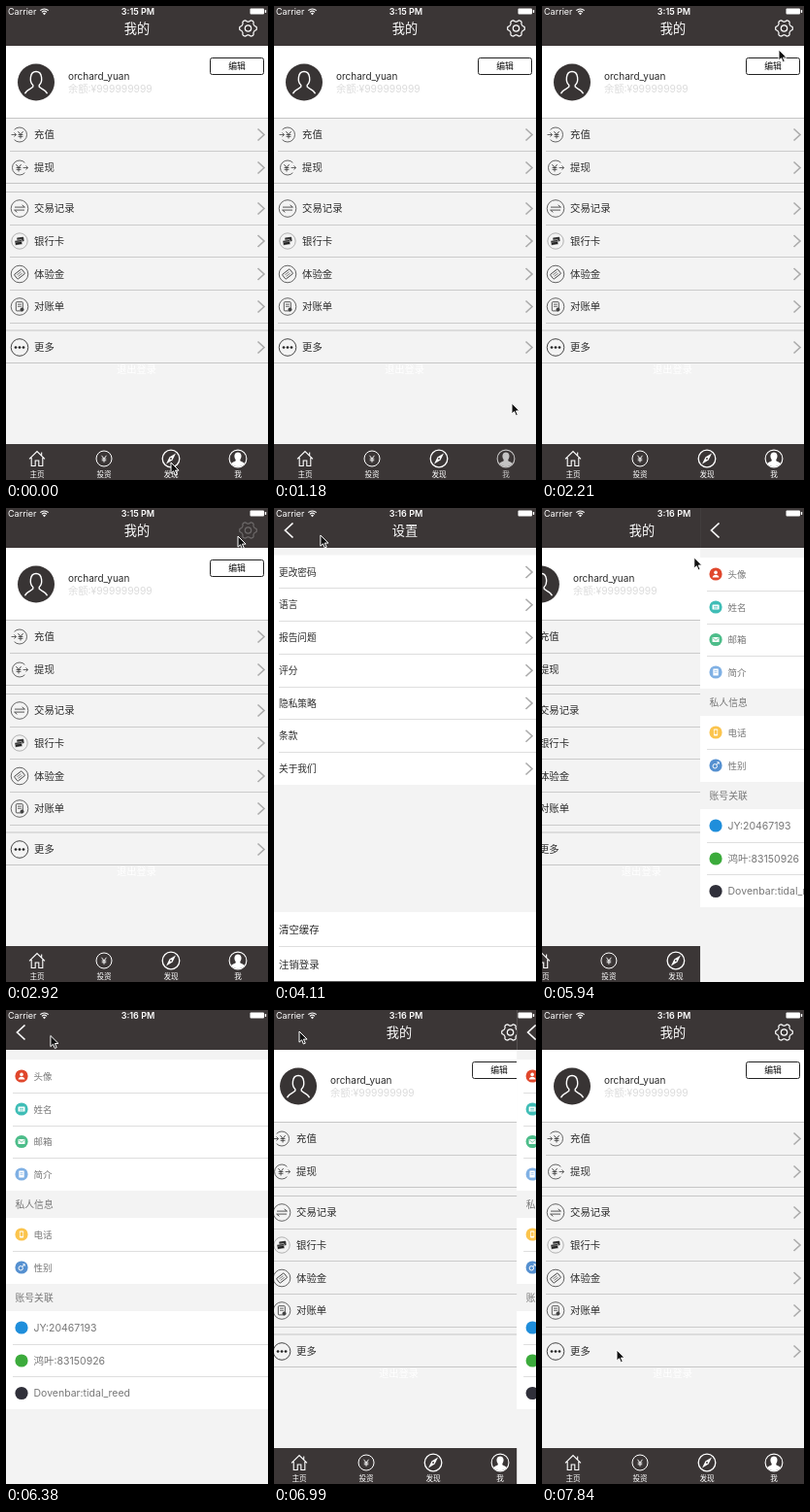
An HTML page that plays this animation: 270 px wide and 488 px high, repeating every 8000 ms.

```html
<!DOCTYPE html>
<html lang="zh-CN">
<head>
<meta charset="utf-8">
<title>我的</title>
<style>
  html, body { margin: 0; width: 100%; height: 100%; overflow: hidden; background: #f3f3f3; }
  svg { display: block; width: 100vw; height: 100vh; }
  text { font-family: Inter, "Noto Sans CJK SC", "Noto Sans CJK", sans-serif; white-space: pre; }
</style>
</head>
<body>
<svg id="stage" viewBox="0 0 270 488" preserveAspectRatio="none"></svg>
<script>
const LOOP = 8000;
const DARK = '#3b3636', GREY = '#f3f3f3', INK = '#2b2b2b';

// Markup helpers
const rect = (x, y, w, h, fill, more = '') =>
  `<rect x="${x}" y="${y}" width="${w}" height="${h}" fill="${fill}" ${more}/>`;
const disc = (x, y, r, fill, more = '') =>
  `<circle cx="${x}" cy="${y}" r="${r}" fill="${fill}" ${more}/>`;
const ring = (x, y, r, color, w = 1) => disc(x, y, r, 'none', `stroke="${color}" stroke-width="${w}"`);
const line = (d, color, w = 1, more = '') =>
  `<path d="${d}" fill="none" stroke="${color}" stroke-width="${w}" ${more}/>`;
const shape = (d, fill) => `<path d="${d}" fill="${fill}"/>`;
const group = (body, attrs = '') => `<g ${attrs}>${body}</g>`;
const at = (x, y, body) => group(body, `transform="translate(${x} ${y})"`);
// Text placed by its vertical middle
const text = (s, x, cy, size, fill, more = '') =>
  `<text x="${x}" y="${(cy + size * 0.37).toFixed(2)}" font-size="${size}" fill="${fill}" ${more}>${s}</text>`;
const MID = 'text-anchor="middle"';
const rule = (x, y, color) => rect(x, y, 270 - x, 1, color);
const chevron = cy => line(`M259.5 ${cy - 6}l6.5 6l-6.5 6`, '#ababab', 1.6);

const navBar = title => rect(0, 0, 270, 41, DARK) + (title ? text(title, 135, 23, 13.2, '#fff', MID) : '');
const backArrow = id => line('M19.5 15.5L11.5 23L19.5 30.5', '#fff', 1.7, `id="${id}"`);

function gear() {
  const pts = [];
  for (let i = 0; i < 72; i++) {
    const a = i * Math.PI / 36;
    const r = 7.9 + 0.95 * Math.tanh(2.2 * Math.cos(6 * a));
    pts.push(`${(r * Math.cos(a)).toFixed(2)} ${(r * Math.sin(a)).toFixed(2)}`);
  }
  return line(`M${pts.join('L')}Z`, '#fff', 1.2) + ring(0, 0, 3.2, '#fff', 1.2);
}

// Menu icons, drawn around 0,0
const yen = (c, k = 1) => line(`M${-2.6 * k} ${-3.4 * k}L0 0L${2.6 * k} ${-3.4 * k}M0 0V${4 * k}M${-2.4 * k} 0H${2.4 * k}M${-2.4 * k} ${1.9 * k}H${2.4 * k}`, c, 0.9);
const ringed = body => ring(0, 0, 8.8, '#555', 0.9) + body;
const icons = {
  topUp: line('M-5.4 -5.2A7.5 7.5 0 1 1 -5.4 5.2M-8.5 0H-3.6M-5.6 -2L-3.4 0L-5.6 2', '#555', 0.9) + at(1, 0, yen('#444')),
  payOut: line('M5.4 -5.2A7.5 7.5 0 1 0 5.4 5.2M3.6 0H8.5M6.5 -2L8.7 0L6.5 2', '#555', 0.9) + at(-1, 0, yen('#444')),
  trade: ringed(line('M-5 -1.4H5.4L2.6 -3.6M5 1.6H-5.4L-2.6 3.8', '#444', 0.9)),
  cards: ring(0, 0, 8.2, '#aaa', 0.9) +
    group(rect(-2.4, -3.8, 7, 4.6, '#333', 'rx=".7"') + rect(-5, -1.2, 7.4, 5, '#222', 'rx=".7" stroke="#f3f3f3" stroke-width=".6"') +
      rect(-5, 0.3, 7.4, 0.8, '#888'), 'transform="rotate(-8)"'),
  ticket: ringed(group(rect(-4.8, -3, 9.6, 6, 'none', 'rx=".8" stroke="#444" stroke-width=".9"') +
    line('M-2.6 -1H2.6M-2.6 1H2.6', '#555', 0.7), 'transform="rotate(-38)"')),
  bill: ringed(rect(-3.7, -4.8, 7, 9.2, 'none', 'rx=".8" stroke="#444" stroke-width=".9"') +
    line('M-2 -2.3H1.8M-2 -.2H1.8', '#444', 0.8) + disc(2.5, 3, 2, '#444')),
  more: ring(0, 0, 8.8, '#444', 1) + [-4, 0, 4].map(x => disc(x, 0, 1.35, '#222')).join('')
};

const menu = [
  ['充值', 132.5, 'topUp'], ['提现', 166.5, 'payOut'], ['交易记录', 208.5, 'trade'],
  ['银行卡', 242, 'cards'], ['体验金', 276, 'ticket'], ['对账单', 309.5, 'bill'], ['更多', 351.5, 'more']
];

const avatar = disc(0, 0, 19, '#383434') +
  line('M-11.5 11.8C-10 7.2 -4.8 7 -3.2 4.7V3C-7 -.4 -6.8 -11 0 -11C6.8 -11 7 -.4 3.2 3V4.7C4.8 7 10 7.2 11.5 11.8', '#fff', 1.4);

const tabs = [
  ['主页', 32, line('M-8 .3L0 -7.5L8 .3M-5.8 -1V7.5H-1.8V2H1.8V7.5H5.8V-1M4.7 -3.5V-6.5', '#fff', 1.1)],
  ['投资', 101, ring(0, 0, 8, '#fff', 1) + yen('#fff', 0.95)],
  ['发现', 170, ring(0, 0, 8.8, '#fff', 1.3) + shape('M5 -5.4L1.6 1.6L-5 5.4L-1.6 -1.6Z', '#fff') + disc(0, 0, 0.9, DARK)],
  ['我', 239, ring(0, 0, 8.9, '#fff', 1.1) +
    shape('M0 -6.6C4 -6.6 4.4 -1.6 2.3 1V2.2C4 3.2 6 3.4 6.9 5.2C3.4 9.2 -3.4 9.2 -6.9 5.2C-6 3.4 -4 3.2 -2.3 2.2V1C-4.4 -1.6 -4 -6.6 0 -6.6Z', '#fff')]
];

const homePage = rect(0, 0, 270, 488, GREY) + rect(0, 41, 270, 74, '#fff') + navBar('我的') +
  at(249.5, 23, group(gear(), 'id="gear"')) +
  at(31, 78.5, avatar) +
  text('orchard_yuan', 64, 72.5, 10, INK) +
  text('余额:¥999999999', 64, 85, 10.3, '#dcdcdc') +
  rect(210.5, 53.5, 55, 17, '#fff', 'rx="2" stroke="#222"') +
  text('编辑', 238, 62, 8.8, '#111', MID) +
  [115, 182, 191, 333.5, 367].map(y => rule(0, y, '#c6c6c6')).join('') +
  [149, 225, 258, 292, 326].map(y => rule(4, y, '#cbcbcb')).join('') +
  menu.map(([s, y, icon]) => at(14, y, icons[icon]) + text(s, 29, y, 10.4, INK) + chevron(y)).join('') +
  text('退出登录', 134.5, 374, 10.3, '#fff', MID + ' font-weight="500"') +
  rect(0, 451, 270, 37, DARK) +
  tabs.map(([s, x, icon], i) => group(at(x, 466, icon) + text(s, x, 482.3, 7.6, '#fff', MID), `id="tab${i}"`)).join('');

const settings = ['更改密码', '语言', '报告问题', '评分', '隐私策略', '条款', '关于我们'];
const settingsPage = rect(0, 0, 270, 488, GREY) + navBar('设置') + backArrow('backA') +
  rect(0, 48.5, 270, 236.5, '#fff') +
  settings.map((s, i) => {
    const y = 66 + i * 33.75;
    return text(s, 5, y, 9.7, INK) + chevron(y) + (i < 6 ? rule(5, Math.round(y + 16.4), '#dedede') : '');
  }).join('') +
  rect(0, 416, 270, 72, '#fff') + rule(5, 451, '#dedede') +
  text('清空缓存', 5, 434, 10.4, INK) + text('注销登录', 5, 470, 10.4, INK) +
  rect(0, 487, 270, 1, '#555');

// Small white marks inside the profile discs
const marks = {
  person: disc(0, -1.6, 1.8, '#fff') + shape('M-3.4 3.6C-3 -.2 3 -.2 3.4 3.6Z', '#fff'),
  card: rect(-3.5, -2.6, 7, 5.2, '#fff', 'rx=".6"') + line('M-2 -.6H2M-2 1H2', '#3fbdb6', 0.7),
  mail: rect(-3.5, -2.6, 7, 5.2, '#fff', 'rx=".6"') + line('M-3.2 -2L0 .8L3.2 -2', '#4dbd8a', 0.8),
  page: rect(-2.7, -3.5, 5.4, 7, '#fff', 'rx=".5"') + line('M-1.5 -1.4H1.5M-1.5 .3H1.5', '#7fb0e4', 0.7),
  phone: rect(-2.1, -3.6, 4.2, 7.2, '#fff', 'rx=".8"') + rect(-1.4, -2.4, 2.8, 4.2, '#fbc44d'),
  sex: ring(-0.8, 0.8, 2.2, '#fff', 1) + line('M.8 -.8L3.2 -3.2M1.2 -3.2H3.2V-1.2', '#fff', 0.9)
};
const fields = [
  ['头像', 68, '#e0472c', 'person'], ['姓名', 102, '#3fbdb6', 'card'], ['邮箱', 135.5, '#4dbd8a', 'mail'],
  ['简介', 169, '#7fb0e4', 'page'], ['电话', 231, '#fbc44d', 'phone'], ['性别', 265, '#5590d0', 'sex'],
  ['JY:20467193', 327, '#1f8edb'], ['鸿叶:83150926', 361, '#3cab3c'], ['Dovenbar:tidal_reed', 394.5, '#30303a']
];
const profilePage = rect(0, 0, 270, 488, GREY) + navBar('') + backArrow('backB') +
  rect(0, 51, 270, 135, '#fff') + rect(0, 214, 270, 68, '#fff') + rect(0, 310, 270, 101, '#fff') +
  [85, 119, 152, 248, 344, 377].map(y => rule(7, y, '#dedede')).join('') +
  text('私人信息', 9.5, 200, 9.8, '#777') + text('账号关联', 9.5, 296, 9.8, '#777') +
  fields.map(([s, y, color, mark]) =>
    at(16, y, disc(0, 0, 6.6, color) + (mark ? marks[mark] : '')) +
    text(s, 28.5, y, mark ? 9.5 : 10.5, '#777')).join('');

const wifi = line('M35.3 4.7A6 6 0 0 1 43.7 4.7M37 6.4A3.6 3.6 0 0 1 42 6.4', '#fff', 1.1) + shape('M38 7.7A2 2 0 0 1 41 7.7L39.5 9.2Z', '#fff');
const statusBar = text('Carrier', 2, 5.5, 9, '#fff') + wifi +
  text('3:15 PM', 136, 5.5, 9, '#fff', MID + ' font-weight="600" id="clock"') +
  rect(251.5, 2.5, 14.5, 6, '#fff', 'rx="1"') + rect(266.8, 4, 1.4, 3, '#fff', 'rx=".6"');

const pointer = '<path d="M0 0V11.2L2.6 8.8L4.4 13L6.3 12.2L4.5 8.1H8.1Z" fill="#111" stroke="#fff" stroke-width="1" stroke-linejoin="round"/>';

document.getElementById('stage').innerHTML =
  group(homePage, 'id="home"') + group(settingsPage, 'id="settings"') + group(profilePage, 'id="profile"') +
  statusBar + group(pointer, 'id="pointer"');

const el = id => document.getElementById(id);
const move = (id, x, y = 0) => el(id).setAttribute('transform', `translate(${x.toFixed(2)} ${y.toFixed(2)})`);

// Pointer stops: time, x, y
const stops = [
  [0, 170, 470], [570, 170, 470], [900, 240, 466], [1010, 240, 466], [1180, 245, 409], [1440, 246, 355],
  [2210, 244, 45], [2560, 239, 29], [3700, 239, 29], [4110, 48, 28], [4200, 38, 26], [4400, 15, 20],
  [4900, 15, 20], [5430, 226, 58], [5680, 226, 58], [5940, 157, 51], [6460, 26, 22],
  [7260, 26, 22], [7780, 77, 350], [LOOP, 77, 350]
];
// Pressed states: id, from, to, opacity
const presses = [
  ['tab2', 420, 570, 0.7], ['tab3', 1010, 1290, 0.7], ['gear', 2700, 3140, 0.25],
  ['backA', 4460, 4640, 0.35], ['backB', 6560, 6720, 0.35]
];
const SLIDE = 400;
const visits = [['settings', 3400, 4680], ['profile', 5895, 6785]];

// Cubic bezier (.2,.75) (.3,1), solved by bisection
function ease(p) {
  if (p <= 0) return 0;
  if (p >= 1) return 1;
  const curve = (s, a, b) => 3 * (1 - s) ** 2 * s * a + 3 * (1 - s) * s * s * b + s ** 3;
  let lo = 0, hi = 1;
  for (let i = 0; i < 24; i++) {
    const s = (lo + hi) / 2;
    if (curve(s, 0.2, 0.3) < p) lo = s; else hi = s;
  }
  return curve(lo, 0.75, 1);
}

function pointerAt(t) {
  const i = stops.findIndex(s => s[0] > t);
  const [t0, x0, y0] = stops[i - 1], [t1, x1, y1] = stops[i];
  const p = (t - t0) / (t1 - t0);
  return [x0 + (x1 - x0) * p, y0 + (y1 - y0) * p];
}

function draw(t) {
  let cover = 0;
  for (const [id, open, close] of visits) {
    const p = ease((t - open) / SLIDE) - ease((t - close) / SLIDE);
    cover = Math.max(cover, p);
    move(id, 270 * (1 - p));
    el(id).style.display = p > 0 ? '' : 'none';
  }
  move('home', -81 * cover);
  for (const [id, from, to, alpha] of presses) {
    el(id).setAttribute('opacity', t >= from && t < to ? alpha : 1);
  }
  const clock = t < 3180 ? '3:15 PM' : '3:16 PM';
  if (el('clock').textContent !== clock) el('clock').textContent = clock;
  move('pointer', ...pointerAt(t));
}

function tick() {
  draw(performance.now() % LOOP);
  requestAnimationFrame(tick);
}
tick();
</script>
</body>
</html>
```
